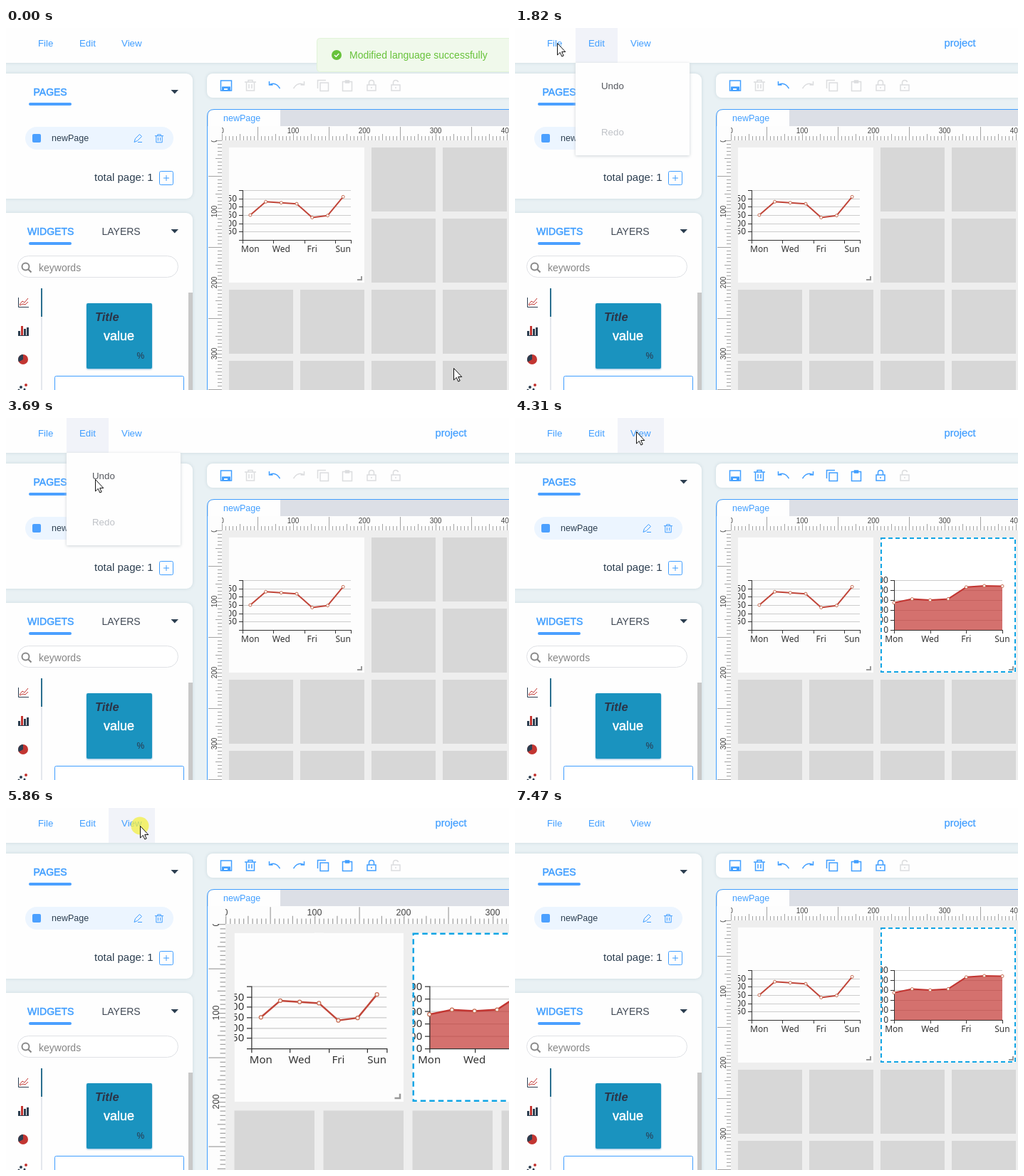
Recreate the animation shown at these times as an HTML page. Size 706 by 509 pixels, loop 7.57 s.

```html
<!DOCTYPE html>
<html lang="en">
<head>
<meta charset="utf-8">
<title>Page editor</title>
<style>
html, body { margin: 0; width: 100%; height: 100%; overflow: hidden; background: #e9f1f4; }
svg { display: block; width: 706px; height: 509px; font-family: "Liberation Sans", Arial, sans-serif; }
.chart text { font: 12px "Noto Sans", "Open Sans", sans-serif; fill: #333; }
.panel { fill: #fefefe; filter: drop-shadow(0 0 2px #c9d8de); }
.icon { fill: none; stroke: currentColor; stroke-width: 1.5; }
</style>
</head>
<body>
<svg id="stage" viewBox="0 0 706 509"></svg>
<script>
const LOOP = 7570, BLUE = '#409eff', DARK = '#2c3e50', RED = '#c23531';
const stage = document.getElementById('stage');
const range = n => [...Array(n).keys()];

const text = (x, y, s, size, fill, extra = '') =>
  `<text x="${x}" y="${y}" font-size="${size}" fill="${fill}" ${extra}>${s}</text>`;
const rect = (x, y, w, h, fill, extra = '') =>
  `<rect x="${x}" y="${y}" width="${w}" height="${h}" fill="${fill}" ${extra}/>`;
const path = (d, stroke, extra = '') => `<path d="${d}" fill="none" stroke="${stroke}" ${extra}/>`;
const heavy = color => `stroke="${color}" stroke-width=".5"`;
const caret = y => `<path d="M231.500 ${y}h10.500l-5.250 5.500z" fill="${DARK}"/>`;

// Rulers, 20 px thick, with zero at (303, 158)
function rulers() {
  let ticks = '', labels = '';
  for (let v = 0; v <= 420; v += 5) {
    const len = v % 100 === 0 ? 9 : v % 50 === 0 ? 19 : v % 25 === 0 ? 9 : 6;
    ticks += `M${303.5 + v} 158v${-len}M303 ${158.5 + v}h${-len}`;
    if (v % 100 === 0) {
      labels += text(303 + v, 148, v, 10, '#444', 'text-anchor="middle" clip-path="url(#topRuler)"');
      labels += `<g clip-path="url(#sideRuler)">` +
        text(0, 0, v, 10, '#444', `text-anchor="middle" transform="translate(296 ${158 + v}) rotate(-90)"`) + '</g>';
    }
  }
  return rect(283, 138, 423, 20, '#fdfdfd') + rect(283, 138, 20, 371, '#fdfdfd') +
    path(ticks, '#a3a3a3') + labels;
}

// One chart; `gap` puts the points in the middle of their category
function chart(left, data, max, step, gap, area) {
  const x0 = left + 19, base = 298, slot = 152 / (gap ? 7 : 6);
  const yOf = v => base - 70 * v / max;
  const points = data.map((v, i) => [x0 + slot * (i + (gap ? .5 : 0)), yOf(v)]);
  const line = 'M' + points.map(p => p.join(' ')).join('L');
  let grid = '', ticks = '', labels = '';
  for (let v = 0; v <= max; v += step) {
    const y = Math.round(yOf(v)) + .5;
    if (v) grid += `M${x0} ${y}h152`;
    ticks += `M${x0 - 5} ${y}h5`;
    if (!gap || (v && v < max)) labels += text(x0 - 8, y + 3.500, v, 12, '#333', 'text-anchor="end"');
  }
  ['Mon', 'Wed', 'Fri', 'Sun'].forEach((day, i) => {
    ticks += `M${Math.round(x0 + slot * 2 * i) + .5} ${base}v5`;
    labels += text(points[2 * i][0], 315, day, 12, '#333', 'text-anchor="middle"');
  });
  if (gap) ticks += `M${x0 + 152.5} ${base}v5`;
  return `<g class="chart"><svg x="${left}" y="168" width="190" height="190" viewBox="${left} 168 190 190">` +
    path(grid, '#ccc') +
    (area ? `<path d="${line}V${base}H${x0}Z" fill="${RED}" opacity=".7"/>` : '') +
    path(`M${x0 + .5} 228V298.500H${x0 + 152}` + ticks, '#333') + labels +
    path(line, area ? RED : '#c1463a', 'stroke-width="2" stroke-linejoin="bevel"') +
    points.map(([x, y]) => `<circle cx="${x}" cy="${y}" r="2" fill="#fff" stroke="#c56a50"/>`).join('') +
    path(`M${left + 186} 349v5h-6`, '#999', 'stroke-width="2"') + '</svg></g>';
}

function canvasArea() {
  const tiles = range(16).map(i =>
    rect(313 + i % 4 * 100, 168 + (i >> 2) * 100, 90, 90, '#d7d7d7')).join('');
  return `<path d="M282.500 509V124q0-9.500 9.500-9.500H706V509Z" fill="#fff"/>` +
    `<path d="M283 138V124q0-9 9-9H706V138Z" fill="#dcdfe6"/>` +
    `<path d="M284 138V124q0-9 9-9h92v23Z" fill="#fefefe"/>` +
    text(305, 131, 'newPage', 12.5, BLUE) +
    `<g clip-path="url(#work)"><g id="zoom">` + rect(303, 158, 403, 351, '#eee') + tiles +
    rect(313, 168, 190, 190, '#fdfdfd') +
    chart(313, [150, 230, 224, 218, 135, 147, 260], 300, 50, true, false) +
    `<g id="areaWidget">` + rect(513, 168, 190, 190, '#fff') +
    chart(513, [820, 932, 901, 934, 1290, 1330, 1320], 1500, 300, false, true) +
    rect(514, 169, 188, 188, 'none', 'stroke="#10a5e5" stroke-width="2" stroke-dasharray="6 4"') + '</g>' +
    rulers() + '</g></g>' +
    path('M282.500 509V124q0-9.500 9.500-9.500H706', BLUE);
}

const trash = 'M-8-5H8M-3-5V-7.500H3V-5M-5.500-5V7H5.500V-5M-2-2V4M2-2V4';
const lock = 'M-6-1H6V7H-6ZM0 2V4M-3.500-1V-4';
const undo = 'M-7.500-1Q1-6 7.500 4M-7.500-6V-1H-2.500';
const tools = [
  ['save', 'M-7.500-7H7.500V7H-7.500ZM-4.500 7V2.500H4.500V7M-7-2H-7M-2 5H1'],
  ['', trash],
  ['undo', undo],
  ['', 'M7.500-1Q-1-6-7.500 4M7.500-6V-1H2.500'],
  ['', 'M-4-4H7.500V7.500H-4ZM-7.500 4V-7.500H4'],
  ['', 'M-6.500-5.500H6.500V7.500H-6.500ZM-2.500-7H2.500V-4H-2.500Z'],
  ['', lock + 'Q-3.500-7.500 0-7.500Q3.500-7.500 3.500-4V-1'],
  ['off', lock + 'Q-3.500-7.500 0-7.500Q3-7.500 3.500-5']
];

function toolbar() {
  return `<rect class="panel" x="282" y="64" width="440" height="34" rx="8"/>` +
    tools.map(([kind, d], i) => {
      const color = kind === 'save' || kind === 'undo' ? BLUE : '#dcdddf';
      return `<path class="icon${kind ? '' : ' tool'}" color="${color}" d="${d}" transform="translate(${309 + 34 * i} 81)"/>`;
    }).join('') + rect(303, 82.5, 12, 6, BLUE) + rect(306, 85, 5, 2, '#fff');
}

function leftPanels() {
  const bars = [[17, 426, 6], [21, 419, 13], [25, 423, 9], [29, 421, 11]];
  return `<rect class="panel" x="-20" y="64" width="282" height="176" rx="9"/>` +
    text(38.5, 95, 'PAGES', 14, BLUE, heavy(BLUE)) + rect(32, 105, 60, 4, '#4ba0ff', 'rx="2"') + caret(87) +
    rect(27, 139, 208, 32, '#ecf5ff', 'rx="16"') + rect(37, 149, 12, 12, '#4ba0ff', 'rx="2"') +
    text(64, 159, 'newPage', 12.5, DARK) +
    path('M180 160.500l1.500-5 6-6 3 3-6 6zM185 160.500h6', BLUE) +
    path(trash, BLUE, 'transform="translate(215 155.500) scale(.76)" stroke-width="1.3"') +
    text(124, 215, 'total page: 1', 15, DARK) +
    rect(215.5, 201.5, 19, 19, 'none', `stroke="${BLUE}" rx="2"`) + path('M221 211h8M225 207v8', BLUE) +

    `<rect class="panel" x="-20" y="260" width="282" height="270" rx="9"/>` +
    text(30, 291, 'WIDGETS', 14, BLUE, heavy(BLUE)) + rect(32, 301, 60, 4, '#4ba0ff', 'rx="2"') +
    text(134.5, 291, 'LAYERS', 14, '#404955') + caret(283) +
    rect(16.5, 320.5, 225, 30, '#fff', 'rx="15" stroke="#dfe1e5"') +
    `<circle cx="27.500" cy="335.500" r="5" fill="none" stroke="#888" stroke-width="2"/>` +
    path('M31 339l4.500 4.500', '#888', 'stroke-width="2.200"') + text(46, 342, 'keywords', 14, '#858585') +
    rect(49, 366, 2, 143, '#e4e7ed') + rect(49, 366, 2, 40, '#2b6f8f') + rect(256, 372, 6, 137, '#c8c8c8') +
    path('M17.500 379v13.500H32', DARK) + path('M19 389l4-5 3 2 5-6M19 390l5-2 3 1 4-4', RED) +
    bars.map(([x, y, h], i) => rect(x, y, 3, h, i === 1 ? RED : DARK)).join('') + rect(17, 432, 15, 1, DARK) +
    `<circle cx="24" cy="466" r="7" fill="${RED}"/><path d="M24 466V459A7 7 0 0 0 18 469.500Z" fill="${DARK}"/>` +
    [[28, 502, 2], [21, 505, 2], [26, 508, 1.5], [18, 509, 1.5]].map(([x, y, r], i) =>
      `<circle cx="${x}" cy="${y}" r="${r}" fill="${i ? DARK : RED}"/>`).join('') +
    rect(113, 387, 92, 92, '#1a93bf', 'rx="2" style="filter:drop-shadow(0 1px 1px #8fb9dd)"') +
    text(125, 412, 'Title', 16.5, '#2c3447', 'font-weight="bold" font-style="italic"') +
    text(137, 439, 'value', 18, '#fff', heavy('#fff')) + text(183.5, 465, '%', 12, '#2c3447') +
    rect(68.5, 489.5, 181, 40, '#fff', `stroke="${BLUE}" rx="2"`);
}

function header() {
  return `<rect class="panel" x="-5" y="-5" width="720" height="54"/>` +
    rect(85, 0, 59, 49, '#f1f3f9', 'id="hoverEdit"') + rect(144, 0, 65, 49, '#f1f3f9', 'id="hoverView"') +
    text(45, 26, 'File', 13.3, BLUE) + text(103, 26, 'Edit', 13.3, BLUE) + text(162, 26, 'View', 13.3, BLUE) +
    text(602.5, 26, 'project', 14.7, BLUE, `stroke="${BLUE}" stroke-width=".25"`);
}

const menu = (name, x, items, secondColor) =>
  `<g id="menu${name}">` + rect(x, 49, 160, 130, '#fefefe', 'rx="1" style="filter:drop-shadow(0 1px 2px #ccd2d6)"') +
  text(x + 36, 86, items[0], 13.3, '#55585e') + text(x + 36, 151, items[1], 13.3, secondColor) + '</g>';

const toast = `<g id="toast">` + rect(436.5, 14.5, 300, 47, '#f0f9eb', 'rx="4" stroke="#e1f3d8"') +
  `<circle cx="464" cy="38" r="7" fill="#67c23a"/>` + path('M461 38l2.300 2.300 4-4.200', '#fff', 'stroke-width="1.400"') +
  text(482, 43, 'Modified language successfully', 14, '#67c23a') + '</g>';

const clip = (id, x, y, w, h) => `<clipPath id="${id}">${rect(x, y, w, h, '#000')}</clipPath>`;

stage.innerHTML = '<defs>' + clip('work', 283, 138, 423, 371) + clip('topRuler', 303, 138, 420, 20) +
  clip('sideRuler', 283, 158, 20, 400) + '</defs>' +
  rect(0, 0, 706, 509, '#e9f1f4') + canvasArea() + toolbar() + leftPanels() + header() +
  menu('Edit', 85, ['Undo', 'Redo'], '#bfc2c7') + menu('View', 144, ['Zoom In', 'Zoom Out'], '#55585e') + toast +
  `<circle id="click" r="12.500" fill="#f2ee3c" opacity=".72"/>` +
  `<path id="cursor" d="M.5.5V17L4.300 13.400L6.800 19L9.200 18L6.700 12.500H11.800Z" fill="#fff" stroke="#111"/>`;

// Cursor moves: first step time, last step time, steps, end x, end y
const moves = [
  [70, 750, 10, 174, 21], [830, 830, 1, 163, 24], [1210, 1520, 5, 122, 18],
  [1670, 1900, 4, 47, 22], [2070, 2220, 3, 112, 21], [2370, 2530, 3, 175, 15],
  [2610, 3060, 7, 111, 33], [3230, 3380, 3, 125, 86], [3840, 4310, 7, 170, 19],
  [4390, 4390, 1, 176, 19], [4700, 5150, 7, 193, 80], [5630, 5860, 4, 188, 25],
  [5940, 6320, 6, 179, 147], [6780, 7240, 7, 666, 489]
];
const menus = [
  [0, ''], [830, 'View'], [1440, 'Edit'], [2450, 'View'], [2980, 'Edit'], [3760, ''],
  [4465, 'View'], [5225, ''], [5935, 'View'], [6475, '']
];
const clicks = [[750, 830], [2220, 2370], [3610, 3685], [4390, 4465], [5860, 5935], [6400, 6475]];

const smooth = p => p * p * (3 - 2 * p);
const within = (t, a, b) => t >= a && t < b;
const el = id => document.getElementById(id);
const show = (id, on) => el(id).setAttribute('visibility', on ? 'visible' : 'hidden');

function cursorAt(t) {
  let x = 628, y = 478;
  for (const [start, end, steps, toX, toY] of moves) {
    if (t < start) break;
    const step = steps === 1 ? 1 : Math.min(steps, 1 + Math.floor((t - start) / (end - start) * (steps - 1) + .15));
    const p = smooth(step / steps);
    x += (toX - x) * p;
    y += (toY - y) * p;
  }
  return [Math.round(x), Math.round(y)];
}

function draw(t) {
  const [x, y] = cursorAt(t);
  const open = menus.filter(m => t >= m[0]).pop()[1];
  const at = `translate(${x} ${y})`;
  el('cursor').setAttribute('transform', at);
  el('click').setAttribute('transform', at);
  show('cursor', t < 7470);
  show('click', clicks.some(([a, b]) => within(t, a, b)));

  for (const [name, left, right] of [['Edit', 85, 144], ['View', 144, 209]]) {
    show('menu' + name, open === name);
    show('hover' + name, open === name || (!open && y < 49 && within(x, left, right)));
  }

  const fade = t < 980 ? 0 : Math.min(1, (Math.floor((t - 980) / 77 + .1) * 77 + 20) / 300);
  const left = (1 - fade) ** 1.5;
  el('toast').setAttribute('opacity', left);
  el('toast').setAttribute('transform', `translate(0 ${-48 * (1 - left)})`);

  const restored = t >= 3760;
  show('areaWidget', restored);
  document.querySelectorAll('.tool').forEach(tool => tool.setAttribute('color', restored ? BLUE : '#dcdddf'));
  el('zoom').setAttribute('transform', within(t, 5225, 6475)
    ? 'translate(283 138) scale(1.25) translate(-283 -138)' : '');
}

const begin = performance.now();
function tick() {
  draw((performance.now() - begin) % LOOP);
  requestAnimationFrame(tick);
}
tick();
</script>
</body>
</html>
```
